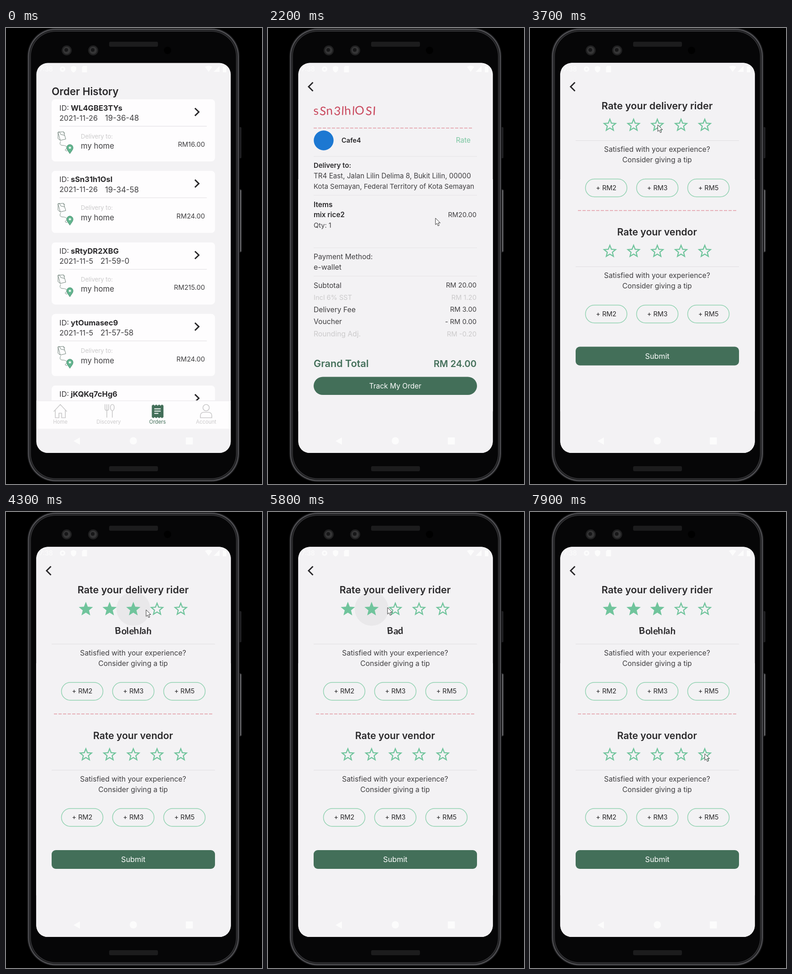
Animation, 561 px wide and 998 px high, one loop 8 s. Source, as an HTML page:

```html
<!DOCTYPE html>
<html lang="en">
<head>
<meta charset="utf-8">
<title>Order rating</title>
<style>
html, body { margin: 0; width: 100%; height: 100%; overflow: hidden; background: #000; }
svg { display: block; width: 561px; height: 998px; font-family: Inter, "Noto Sans", sans-serif; }
text { white-space: pre; }
.hand { font-family: Lato, sans-serif; }
</style>
</head>
<body>
<svg id="stage" viewBox="0 0 561 998" xmlns="http://www.w3.org/2000/svg"></svg>
<script>
const LOOP = 8000, STEP = 100;
const BG = '#f3f2f4', INK = '#29282a', SOFT = '#3f3e40', PALE = '#cbcacb';
const GREEN = '#436f59', MINT = '#70c49c', ROSE = '#e298a3';

// y is the middle of the capitals
const text = (x, y, s, size, { fill = SOFT, weight = 400, at = 'start', more = '' } = {}) =>
  `<text x="${x}" y="${(y + size * 0.355).toFixed(1)}" font-size="${size}" font-weight="${weight}" fill="${fill}" text-anchor="${at}" ${more}>${s}</text>`;
const rect = (x, y, w, h, r, fill, more = '') =>
  `<rect x="${x}" y="${y}" width="${w}" height="${h}" rx="${r}" fill="${fill}" ${more}/>`;
const circle = (x, y, r, fill, more = '') => `<circle cx="${x}" cy="${y}" r="${r}" fill="${fill}" ${more}/>`;
const line = (d, stroke, width, more = '') =>
  `<path d="${d}" fill="none" stroke="${stroke}" stroke-width="${width}" ${more}/>`;
const group = (id, body, more = '') => `<g id="${id}" ${more}>${body}</g>`;
const rule = (y, fill = '#e5e3e6') => line(`M100 ${y}H458`, fill, 1);
const dashes = (x, y) => line(`M${x} ${y}h349`, ROSE, 1.4, 'stroke-dasharray="7 3"');
const back = line('M98.5 119l-9.5 9.5 9.5 9.5', INK, 3);
const paper = rect(66, 76, 427, 855, 0, BG);

function phone() {
  const lens = x => circle(x, 49, 11, '#202021') + circle(x, 49, 8, '#353536') + circle(x - 1, 48, 4, '#171718');
  // nested shells: distance from the outer edge and colour
  const rim = [[0, '#1d1d1f'], [2, '#56565a'], [4, '#202022'], [6.5, '#343437'], [8, '#060607']]
    .map(([d, fill]) => rect(46.5 + d, d, 465.5 - 2 * d, 993.5 - 2 * d, 62 - d, fill)).join('');
  return rect(510, 217, 6, 68, 2, '#1f1f21') + rect(510, 353, 6, 138, 2, '#2a2a2c') +
    line('M514.5 355v134', '#8a8a8e', 1.5) + rim +
    rect(226, 30, 107, 11, 3, '#1c1c1d') + rect(226, 959, 107, 11, 3, '#1c1c1d') +
    lens(133) + lens(191) + circle(354, 49, 8, '#000') +
    rect(66.5, 76.5, 426, 853.5, 25, BG);
}

function card([id, date, time, price], i) {
  const y = 156 + i * 156.6;
  return `<g transform="translate(0 ${y.toFixed(1)})">` + rect(100, 0, 358, 136, 8, '#fefdfe') +
    text(117, 19, 'ID:', 16.5) + text(142, 19, id, 16.5, { fill: INK, weight: 700 }) +
    text(117, 41, date, 16.2) + text(date.length > 9 ? 217 : 207, 41, time, 16.8) +
    line('M117 59H440', '#e9e7ea', 1.5) +
    line('M414 19.5l8.5 8.3-8.5 8.3', INK, 3) +
    line('M114 72l12-1 5 16-12 3zM114 72l3-1 3 6 9 2M119 90l-5-4v-14M126 71l3 4', '#6e8078', 1) +
    line('M120 92c-3 5-2 9 5 9s12 5 5 9q-1 3 4 3', '#75887f', 1) +
    `<path d="M140 119c-4-6-7-9-7-13a7 7 0 0 1 14 0c0 4-3 7-7 13z" fill="#62b58f" stroke="#4d8d70"/>` +
    circle(140, 106, 2.5, '#e8f5ee') +
    text(164, 81, 'Delivery to:', 13.1, { fill: PALE }) + text(164, 102, 'my home', 16.8) +
    text(436, 99, price, 14.6, { at: 'end' }) + '</g>';
}

function tabs() {
  const label = (x, s, fill = PALE) => text(x, 861.5, s, 11.3, { fill, at: 'middle' });
  const grey = d => line(d, PALE, 1.7, 'stroke-linejoin="round" stroke-linecap="round"');
  const receipt = 'M319.5 826.5' + 'l3.2-2.5 3.200 2.5'.repeat(4) + 'V851.5' + 'l-3.200 2.5-3.200-2.5'.repeat(4) + 'z';
  return rect(66.5, 815, 426, 2, 0, '#eeecef') + rect(66.5, 816.5, 426, 61, 0, '#fefdfe') +
    grey('M105 839l14-15 14 15M108 836v17h8v-10h6v10h8v-17') +
    grey('M217 824v9q0 4 4 4t4-4v-9M221 824v28M233 838v14M233 838c-6-3-5-14 0-14s6 11 0 14z') +
    grey('M426 853v-4q0-8 8-8h9q8 0 8 8v4z') + circle(438.5, 831, 7, 'none', `stroke="${PALE}" stroke-width="1.7"`) +
    `<path d="${receipt}" fill="${GREEN}"/>` + line('M325 833.5h14M325 838.5h14M325 843.5h9', '#fff', 2) +
    label(119, 'Home') + label(225, 'Discovery') + label(332, 'Orders', GREEN) + label(438.5, 'Account');
}

function history() {
  const orders = [
    ['WL4GBE3TYs', '2021-11-26', '19-36-48', 'RM16.00'],
    ['sSn31h1OsI', '2021-11-26', '19-34-58', 'RM24.00'],
    ['sRtyDR2XBG', '2021-11-5', '21-59-0', 'RM215.00'],
    ['ytOumasec9', '2021-11-5', '21-57-58', 'RM24.00'],
    ['jKQKq7cHg6', '', '', '']
  ];
  return text(100, 139, 'Order History', 22.5, { fill: INK, weight: 600 }) +
    `<g clip-path="url(#list)">${orders.map(card).join('')}</g>` + tabs() +
    rect(66.5, 877.5, 426, 53, 0, BG);
}

function details(ready) {
  const bold = { fill: INK, weight: 600 }, end = { at: 'end' };
  const top = ready ? 386 : 300, pay = ready ? 500.5 : 339, sum = ready ? 563 : 402;
  const rows = [
    ['Subtotal', 'RM 20.00'], ['Incl 6% SST', 'RM 1.20', 1], ['Delivery Fee', 'RM 3.00'],
    ['Voucher', '- RM 0.00'], ['Rounding Adj.', 'RM -0.20', 1]
  ];
  let out = text(100, 181, 'sSn3lhlOSI', 26, {
    fill: '#c9485d',
    more: 'class="hand" letter-spacing="1.4" rotate="-4 5 -3 4 3 -3 3 -5 4 3"'
  }) + dashes(100, 219) + circle(122, 246, 21.7, ready ? '#1c78d2' : '#74b0a4');
  if (ready) {
    out += text(161, 245.5, 'Cafe4', 14.6, bold) + text(444, 245.5, 'Rate', 15.4, { at: 'end', fill: '#7ac7a1' }) +
      rule(281) + text(100, 300.5, 'Delivery to:', 14.9, bold) +
      text(100, 323.5, 'TR4 East, Jalan Lilin Delima 8, Bukit Lilin, 00000', 15.2) +
      text(100, 346.5, 'Kota Semayan, Federal Territory of Kota Semayan', 15) + rule(366) +
      text(100, 409, 'mix rice2', 15.3, bold) + text(457, 409, 'RM20.00', 14.6, end) +
      text(100, 432, 'Qty: 1', 14.6) + rule(481) + text(100, 523.5, 'e-wallet', 16) + rule(543);
  }
  out += text(100, top, 'Items', 15.5, bold) + text(100, pay, 'Payment Method:', 15.6);
  rows.forEach(([name, value, dim], i) => {
    const y = sum + i * 26.6, fill = dim ? PALE : SOFT;
    const shown = ready ? value : name === 'Voucher' ? '- RM 0.00' : 'RM 0.00';
    out += text(100, y, name, i === 1 ? 14.6 : 15.7, { fill }) + text(457, y, shown, 14.7, { at: 'end', fill });
  });
  const total = { fill: GREEN, weight: 600 };
  return out + text(100, sum + 171.5, 'Grand Total', 21.6, total) +
    text(457, sum + 171.5, ready ? 'RM 24.00' : 'RM 0.00', 20.1, { ...total, at: 'end' }) +
    rect(100, sum + 200.5, 358, 39.5, 20, GREEN) +
    text(279, sum + 220, 'Track My Order', 15.5, { fill: '#fff', at: 'middle' });
}

function starPath(scale) {
  let d = '';
  for (let i = 0; i < 10; i++) {
    const a = i * Math.PI / 5, r = (i % 2 ? 7.2 : 16.4) * scale;
    d += `${i ? 'L' : 'M'}${(r * Math.sin(a)).toFixed(2)} ${(-r * Math.cos(a)).toFixed(2)}`;
  }
  return d + 'z';
}
const FULL = starPath(1), HOLLOW = FULL + starPath(0.62);

function stars(cls, y) {
  return [0, 1, 2, 3, 4].map(i =>
    `<path class="${cls}" transform="translate(${175 + i * 52} ${y})" d="${HOLLOW}" fill="${MINT}" fill-rule="evenodd"/>`).join('');
}

function tips(dy) {
  const mid = { at: 'middle' };
  return rule(289 + dy, '#dfdde0') +
    text(278.5, 308 + dy, 'Satisfied with your experience?', 15.7, mid) +
    text(278.5, 331 + dy, 'Consider giving a tip', 15.7, mid) +
    [2, 3, 5].map((n, i) => {
      const x = 121.5 + i * 112;
      return rect(x, 373 + dy, 91, 39, 19.5, 'none', 'stroke="#91d2b1" stroke-width="1.5"') +
        text(x + 45.5, 392 + dy, '+ RM' + n, 14.5, { at: 'middle', fill: INK });
    }).join('');
}

function rating() {
  const head = { fill: INK, weight: 600, at: 'middle' };
  const hand = { fill: INK, weight: 700, at: 'middle', more: 'id="label" class="hand" rotate="-5 4 -3 5 -4 5 -4 3"' };
  return circle(0, 212, 37, '#000', 'id="ripple"') + back +
    text(278.5, 170.5, 'Rate your delivery rider', 21.6, head) + stars('rider', 213) +
    text(279, 260, '', 20.5, hand) +
    group('lower', tips(0) + dashes(105, 442) +
      text(278.5, 489, 'Rate your vendor', 21.2, head) + stars('vendor', 531.5) + tips(276) +
      rect(100, 740, 358, 41, 9, GREEN) +
      text(279, 760.5, 'Submit', 16.2, { fill: '#fff', at: 'middle' }));
}

function system() {
  const w = '#fcfcfc';
  return text(73, 90, '7:38', 14.5, { fill: w }) +
    circle(124, 90, 4.2, 'none', `stroke="${w}" stroke-width="3.6"`) +
    `<path d="M148 83l6 2.5v4q0 5-6 8-6-3-6-8v-4zM169 83h8.500v14h-11v-11zM436 85q8-5 16 0l-8 11zM468 83v13h-13z" fill="${w}"/>` +
    rect(475, 84, 8, 13, 1, w) +
    `<path d="M148 904l14-8v16z" fill="${w}"/>` + circle(279, 903.5, 8, w) + rect(394, 896, 15.5, 15.5, 1, w);
}

const stage = document.getElementById('stage');
stage.innerHTML =
  `<defs><clipPath id="screen">${rect(66.5, 76.5, 426, 853.5, 25, '#000')}</clipPath>` +
  `<clipPath id="list">${rect(66, 150, 427, 666, 0, '#000')}</clipPath></defs>` + phone() +
  `<g clip-path="url(#screen)">` + history() +
  group('detailPage', paper + back + group('empty', details(false)) + group('ready', details(true))) +
  group('ratePage', paper + rating()) + system() + '</g>' +
  group('cursor', `<path d="M0 0v14.500l3.300-3 2.200 5.500 2.600-1-2.300-5.400h4.600z" fill="#fff" stroke="#333" stroke-width="1"/>`);

const $ = id => document.getElementById(id);
const riders = [...document.querySelectorAll('.rider')];

// Each new page rises a quarter of the screen while it fades in.
const clips = [['detailPage', 1414], ['ratePage', 2999]].flatMap(([id, delay]) => {
  const play = (frames, easing) => {
    const clip = $(id).animate(frames, { delay, duration: 300, easing, fill: 'both' });
    clip.pause();
    return clip;
  };
  return [
    play([{ transform: 'translateY(213px)' }, { transform: 'translateY(0px)' }], 'cubic-bezier(.4,0,.2,1)'),
    play([{ opacity: 0 }, { opacity: 1 }], 'ease-in')
  ];
});

// time, x, y of the pointer tip
const path = [
  [100, 455, 250], [200, 414, 338], [1500, 414, 338], [2200, 367, 416], [2400, 372, 400], [2800, 426, 245],
  [3000, 426, 245], [3200, 357, 266], [3700, 280, 212], [4200, 282, 212], [4300, 307, 214], [4800, 383, 213],
  [5000, 383, 213], [5500, 229, 209], [5700, 232, 209], [5800, 262, 209], [6100, 280, 211], [6700, 290, 213],
  [7500, 386, 515], [7700, 385, 526], [7900, 383, 529]
];
const taps = [[4200, 3], [5600, 2], [6200, 3]];
const labels = { 2: 'Bad', 3: 'Bolehlah' };

function pointer(t) {
  const i = path.findIndex(p => p[0] > t);
  if (i < 0) return path[path.length - 1].slice(1);
  const [a, b] = [path[i - 1], path[i]], k = (t - a[0]) / (b[0] - a[0]);
  return [a[1] + (b[1] - a[1]) * k, a[2] + (b[2] - a[2]) * k];
}

function draw(t) {
  clips.forEach(c => { c.currentTime = t; });
  const loaded = t >= 1800;
  $('empty').style.display = loaded ? 'none' : '';
  $('ready').style.display = loaded ? '' : 'none';

  const tap = taps.filter(p => p[0] <= t).pop();
  const score = tap ? tap[1] : 0;
  riders.forEach((s, i) => s.setAttribute('d', i < score ? FULL : HOLLOW));
  $('label').textContent = labels[score] || '';
  $('lower').setAttribute('transform', `translate(0 ${score ? 0 : -42.5})`);

  const age = tap ? t - tap[0] : LOOP;
  $('ripple').setAttribute('cx', 123 + score * 52);
  $('ripple').setAttribute('opacity', 0.042 * Math.max(0, Math.min(1, (600 - age) / 300)));

  $('cursor').style.display = t < 100 ? 'none' : '';
  if (t >= 100) $('cursor').setAttribute('transform', `translate(${pointer(t).map(v => v.toFixed(1)).join(' ')})`);
}

const start = performance.now();
function tick() {
  const t = (performance.now() - start) % LOOP;
  draw(Math.floor(t / STEP) * STEP);
  requestAnimationFrame(tick);
}
tick();
</script>
</body>
</html>
```
